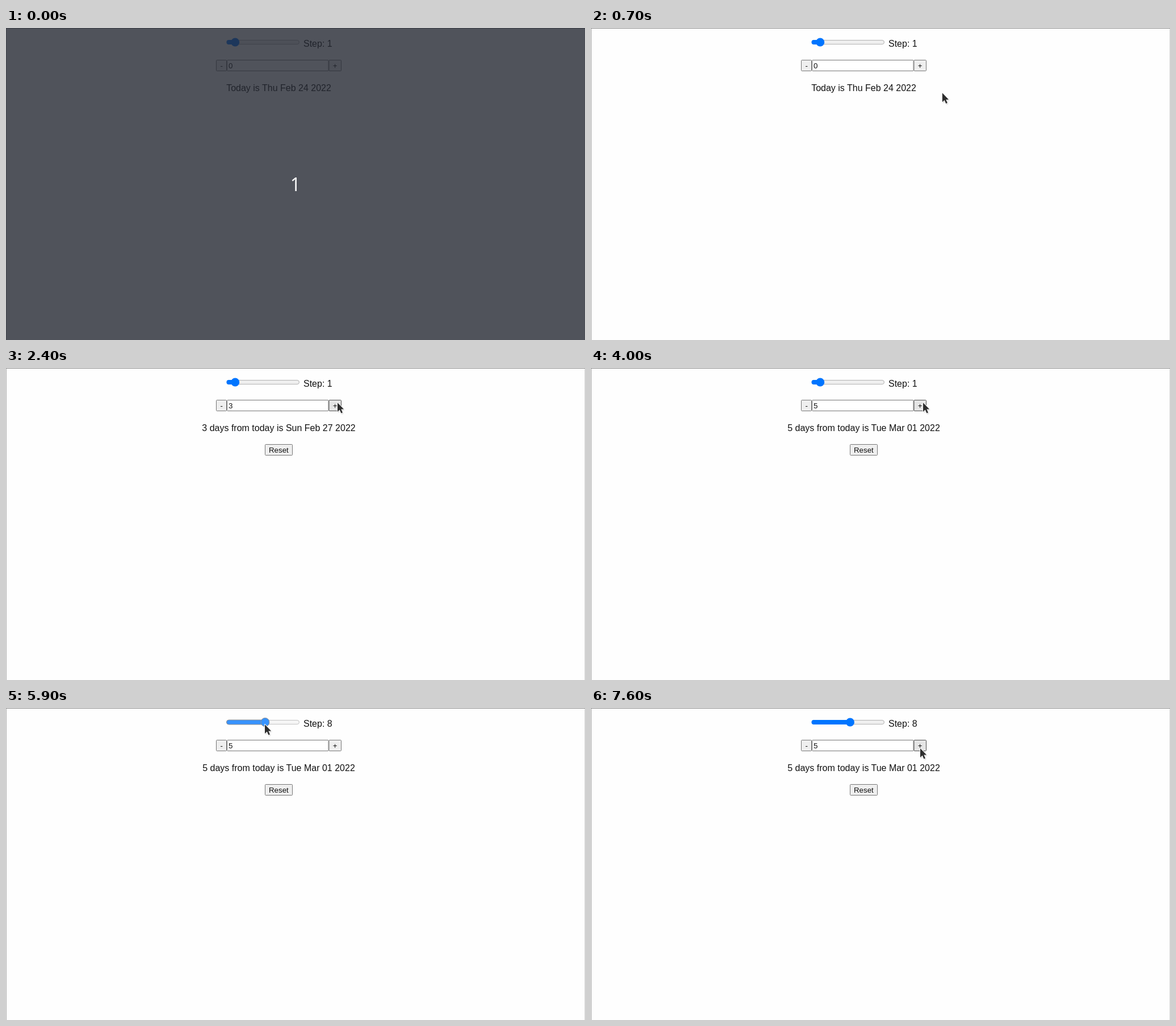
An HTML page for the animation above (8 s loop, 1020 px wide and 549 px high).

```html
<!DOCTYPE html>
<html lang="en">
<head>
<meta charset="utf-8">
<title>Date counter</title>
<style>
  html, body { margin: 0; width: 1020px; height: 549px; overflow: hidden; background: #fefefe; }
  svg { display: block; }
  text { font: 16px "Liberation Sans", Arial, sans-serif; fill: #111; }
  .small { font-size: 13.333px; }
  .mid { text-anchor: middle; }
  .box { stroke: #767676; fill: #efefef; }
  .hover { stroke: #4f4f4f; fill: #e5e5e5; }
  .pressed { stroke: #8d8d8d; fill: #f5f5f5; }
  #track { fill: #efefef; stroke: #b2b2b2; }
  .slider { fill: #0075ff; }
  .slider.hover { fill: #005cc8; }
  .slider.pressed { fill: #3793ff; }
  #track.hover { fill: #e5e5e5; stroke: #a0a0a0; }
  #track.pressed { fill: #f5f5f5; stroke: #c4c4c4; }
  #count { font: 32px "Open Sans", "Noto Sans", sans-serif; fill: #fff; }
</style>
</head>
<body>
<svg width="1020" height="549" viewBox="0 0 1020 549">
  <rect width="1020" height="549" fill="#fefefe"/>
  <rect width="1" height="549" fill="#b4b4b4"/>
  <rect x="1019" width="1" height="549" fill="#dedede"/>
  <rect width="1020" height="1" fill="#8c8c8c"/>

  <rect id="track" x="389" y="21.5" width="127.5" height="7" rx="3.5"/>
  <rect id="fill" class="slider" x="388.5" y="21" height="8" rx="4"/>
  <circle id="thumb" class="slider" cy="25" r="7.5"/>
  <text id="step" x="524" y="33"></text>

  <rect class="box" x="370.5" y="56.5" width="18" height="19" rx="1"/>
  <text class="small mid" x="379.7" y="71">-</text>
  <rect class="box" x="389.5" y="56.5" width="178.5" height="19" rx="1" style="fill:#fff"/>
  <text id="value" class="small" x="392" y="71"></text>
  <rect id="plus" x="569" y="56.5" width="21.5" height="19" rx="1"/>
  <text class="small mid" x="579.6" y="71">+</text>

  <text id="date" class="mid" x="480.5" y="111"></text>
  <g id="reset">
    <rect class="box" x="456.5" y="134.5" width="48" height="19" rx="1"/>
    <text class="small mid" x="480.4" y="149">Reset</text>
  </g>

  <g id="cursor">
    <path d="M0 0V16L3.8 12.6L6.4 18.6L9 17.5L6.4 11.6H11.2Z" transform="translate(1 1.5)"
      fill="#000" opacity=".3" style="filter:blur(1px)"/>
    <path d="M0 0V16L3.8 12.6L6.4 18.6L9 17.5L6.4 11.6H11.2Z"
      fill="#2d2d2d" stroke="#fff" stroke-width="1.8" stroke-linejoin="round" paint-order="stroke"/>
  </g>

  <g id="countdown">
    <rect width="1020" height="549" fill="#252932" opacity=".8"/>
    <text id="count" class="mid" x="510" y="287">1</text>
  </g>
</svg>
<script>
  const LOOP = 8000, TICK = 100;
  const $ = id => document.getElementById(id);

  // Pointer stops: time, x, y
  const path = [
    [200, 760, 330], [900, 584, 61], [3900, 584, 61], [4000, 585, 61],
    [4800, 403, 24], [5200, 403, 24], [5900, 456, 29], [7000, 456, 29], [7600, 580, 71]
  ];
  // Times at which the day count goes up by one
  const clicks = [1400, 1900, 2400, 2800, 3100];
  const presses = [1300, 2300, 2700, 3000];
  const drag = [5000, 7000];

  const ease = k => k * k * (3 - 2 * k);
  const mix = (a, b, k) => a + (b - a) * k;

  function pointer(t) {
    const i = path.findIndex(p => p[0] > t);
    if (i < 0) return path[path.length - 1].slice(1);
    const a = path[Math.max(i - 1, 0)], b = path[i];
    const k = ease(Math.max(0, (t - a[0]) / (b[0] - a[0])));
    return [mix(a[1], b[1], k), mix(a[2], b[2], k)];
  }

  const inside = ([x, y], l, t, r, b) => x >= l && x < r && y >= t && y < b;
  const look = (pressed, hover) => pressed ? "pressed" : hover ? "hover" : "";

  function render(time) {
    const t = Math.floor(time / TICK) * TICK;
    const tip = pointer(t), visible = t >= 200;

    $("countdown").style.display = t < 100 ? "" : "none";
    $("cursor").style.display = visible ? "" : "none";
    $("cursor").setAttribute("transform", `translate(${tip[0]} ${tip[1]})`);

    const step = t < 5300 ? 1 : Math.round((Math.min(tip[0], 456) - 396.2) / 7.533);
    const size = t < 7000 ? step : 8;
    const x = 396.2 + 7.533 * size;
    const state = look(t >= drag[0] && t < drag[1], visible && inside(tip, 388, 17, 518, 33));
    $("thumb").setAttribute("cx", x);
    $("fill").setAttribute("width", x - 388.5);
    $("track").setAttribute("class", state);
    for (const id of ["fill", "thumb"]) $(id).setAttribute("class", "slider " + state);
    $("step").textContent = "Step: " + size;

    const plus = look(presses.includes(t), visible && inside(tip, 569, 56, 591, 76));
    $("plus").setAttribute("class", "box " + plus);

    const days = clicks.filter(c => c <= t).length;
    const day = new Date(2022, 1, 24 + days).toDateString();
    $("value").textContent = days;
    $("date").textContent = (days ? days + " days from today is " : "Today is ") + day;
    $("reset").style.display = days ? "" : "none";
  }

  const start = performance.now();
  function loop() {
    render((performance.now() - start) % LOOP);
    requestAnimationFrame(loop);
  }
  loop();
</script>
</body>
</html>
```
